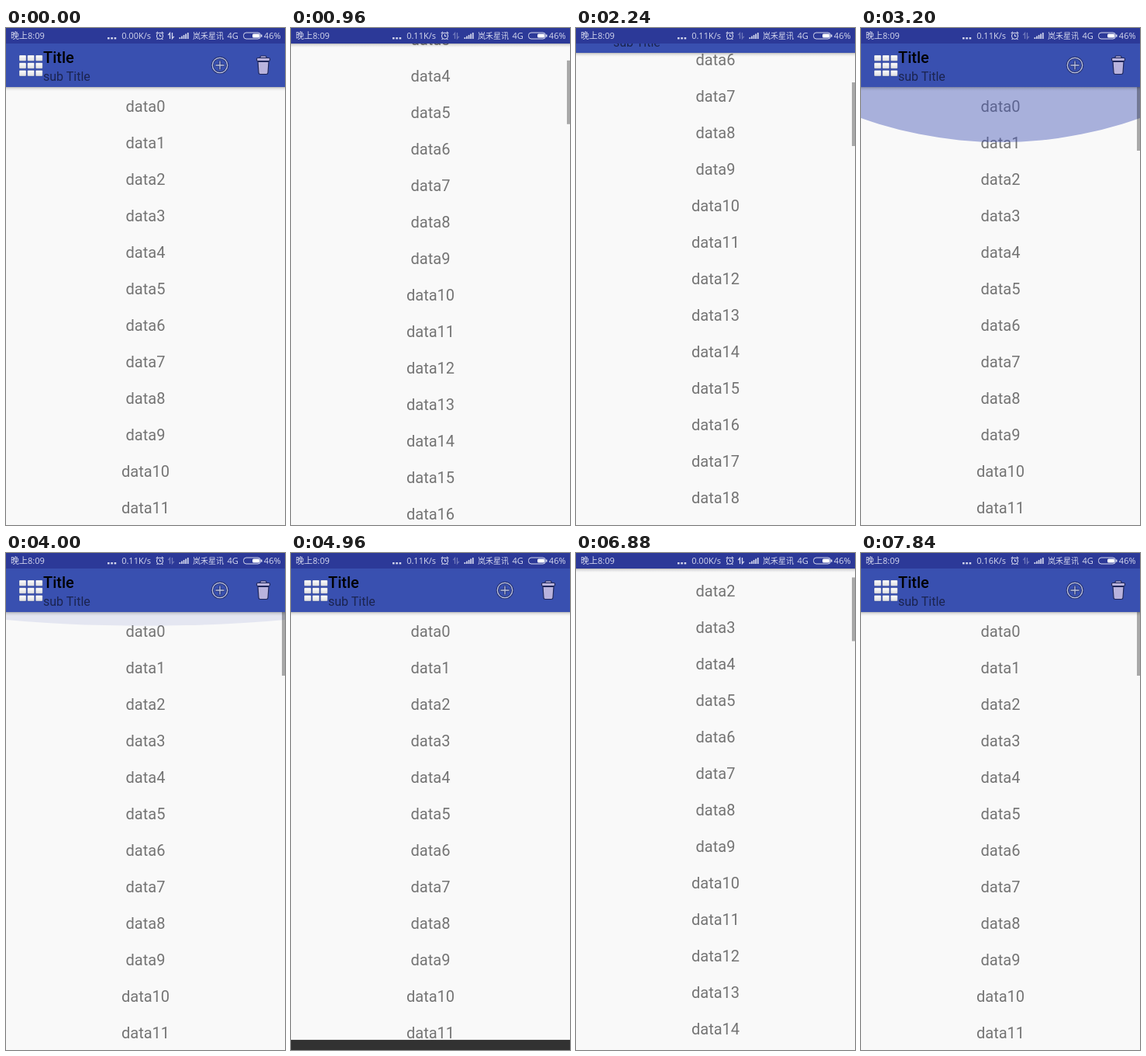
These frames come from a looping animation (360x640 px, 8 s). An HTML page:

```html
<!DOCTYPE html>
<html lang="zh">
<head>
<meta charset="utf-8">
<title>Scrolling list</title>
<style>
  html, body { margin: 0; width: 100%; height: 100%; overflow: hidden; background: #f9f9f9; }
  svg { display: block; width: 360px; height: 640px; }
  text { font-family: Roboto, "Noto Sans", sans-serif; }
  #rows { font-size: 20px; fill: #747474; text-anchor: middle; }
  #status text { font: 11px "Open Sans", "Noto Sans CJK SC", "Noto Sans CJK", sans-serif; fill: #d6d9ee; }
  #status .end { text-anchor: end; }
  #status .carrier { font-size: 10px; }
</style>
</head>
<body>
<svg viewBox="0 0 360 640">
  <defs>
    <linearGradient id="shade" x2="0" y2="1">
      <stop offset="0" stop-color="#000" stop-opacity=".26"/>
      <stop offset=".4" stop-color="#000" stop-opacity=".09"/>
      <stop offset="1" stop-color="#000" stop-opacity="0"/>
    </linearGradient>
    <linearGradient id="cell" x2="0" y2="1">
      <stop offset="0" stop-color="#fff"/>
      <stop offset="1" stop-color="#dcdcdf"/>
    </linearGradient>
    <clipPath id="below"><rect width="360" height="80"/></clipPath>
  </defs>

  <rect width="360" height="640" fill="#f9f9f9"/>
  <g id="rows"></g>
  <g id="glow"><g clip-path="url(#below)">
    <circle cx="180" cy="-469" r="540" fill="#3f51b5"/>
  </g></g>
  <rect id="thumb" x="356" width="4" height="82" fill="#000"/>

  <g id="bar">
    <rect y="76" width="360" height="5" fill="url(#shade)"/>
    <rect y="16" width="360" height="60" fill="#3950b0"/>
    <g id="grid" fill="url(#cell)" stroke="#2b3a80" stroke-opacity=".45" stroke-width=".7"></g>
    <text x="48" y="45" font-size="20" font-weight="500" fill="#000">Title</text>
    <text x="48" y="68" font-size="16" fill="#1b2450">sub Title</text>
    <g fill="none">
      <g stroke="#26326f" stroke-width="3.2">
        <circle cx="276" cy="48" r="9.7"/><path d="M270 48h12M276 42v12"/>
      </g>
      <g stroke="#bcc2e2" stroke-width="1.3">
        <circle cx="276" cy="48" r="9.7"/><path d="M270.5 48h11M276 42.5v11"/>
      </g>
    </g>
    <g fill="#b9b3dd" stroke="#20285c" stroke-width="1.2">
      <path d="M325 43.5h14l-1 14q-.2 2-2 2h-8q-1.8 0-2-2z"/>
      <path d="M328 39v-1.500q0-1.500 1.500-1.500h5q1.500 0 1.500 1.500v1.500z"/>
      <rect x="323.500" y="38.500" width="17" height="4" rx="1.500"/>
    </g>
  </g>

  <g id="status">
    <rect width="360" height="20" fill="#2c3998"/>
    <text x="6" y="14">晚上8:09</text>
    <g fill="#d6d9ee">
      <rect x="131" y="12" width="2.600" height="2.400"/>
      <rect x="135.300" y="12" width="2.600" height="2.400"/>
      <rect x="139.600" y="12" width="2.600" height="2.400"/>
    </g>
    <text id="speed" class="end" x="187" y="14"></text>
    <g fill="none" stroke="#d6d9ee" stroke-width="1.100">
      <circle cx="198.500" cy="10.300" r="4"/>
      <path d="M198.500 8v2.500h2M193.800 7l2.300-2M203.200 7l-2.300-2M195.800 13.600l-1.200 1.400M201.200 13.600l1.200 1.400"/>
      <path id="arrows" stroke-width="1.300" d="M211.500 14V6.500l-2.300 2.600M214.500 6v7.500l2.300-2.600"/>
    </g>
    <g id="signal" fill="#d6d9ee"></g>
    <text class="carrier" x="241" y="14">岚禾星讯</text>
    <text x="285.500" y="14">4G</text>
    <rect x="306.500" y="6" width="22" height="8" rx="3.500" fill="none" stroke="#d6d9ee"/>
    <rect x="318" y="7.500" width="9.500" height="5" rx="1.500" fill="#fff"/>
    <rect x="329" y="8.500" width="1.500" height="3" fill="#d6d9ee"/>
    <text class="end" x="354.500" y="14">46%</text>
  </g>

  <rect id="snack" width="360" height="48" fill="#323232"/>
</svg>

<script>
const LOOP = 8000, STEP = 160, ROW = 47;
const $ = id => document.getElementById(id);

function add(parent, tag, attrs, text = "") {
  const el = document.createElementNS("http://www.w3.org/2000/svg", tag);
  for (const key in attrs) el.setAttribute(key, attrs[key]);
  el.textContent = text;
  $(parent).append(el);
}

for (let i = 0; i < 24; i++) add("rows", "text", { x: 180, y: 107.5 + ROW * i }, "data" + i);
for (let i = 0; i < 9; i++) {
  add("grid", "rect", {
    x: 17 + 10.6 * (i % 3), y: 35 + 9.7 * Math.floor(i / 3), width: 9, height: 7.6, rx: 1
  });
}
for (let i = 0; i < 5; i++) {
  const h = 2 + 1.5 * i;
  add("signal", "rect", { x: 223.5 + 2.6 * i, y: 14 - h, width: 1.7, height: h });
}

// Each track is a list of [time, value] pairs.
// A drag moves the bar first; the list takes up the rest.
const hidden = [[160, 0], [400, 56], [2200, 56], [2240, 44], [2380, 0],
  [6400, 0], [6560, 56], [7040, 56], [7200, 0]];
const scroll = [[400, 0], [960, 171], [1700, 298], [2380, 298], [2960, 0],
  [6560, 0], [6880, 90], [7200, 90], [7520, 0]];
const thumbFade = [[100, 0], [300, 1], [4080, 1], [4440, 0], [6400, 0], [6560, 1]];
const glowSize = [[2960, 0], [3200, 1], [3680, 1], [4320, 0]];
const snackRise = [[4915, 0], [5085, 48], [6121, 48], [6291, 0]];
const speeds = [[0, "0.00"], [480, "0.11"], [5440, "0.00"], [7840, "0.16"]];

const linear = p => p;
const slowDown = p => 1 - (1 - p) ** 2;

// Cubic curve (.4, 0, .2, 1), solved for time by bisection.
function standard(p) {
  let lo = 0, hi = 1;
  for (let i = 0; i < 20; i++) {
    const u = (lo + hi) / 2, v = 1 - u;
    if (1.2 * v * v * u + .6 * v * u * u + u * u * u < p) lo = u; else hi = u;
  }
  return lo * lo * (3 - 2 * lo);
}

function at(track, t, ease = linear) {
  const i = track.findIndex(([time]) => time > t);
  if (i === 0) return track[0][1];
  if (i < 0) return track[track.length - 1][1];
  const [t0, a] = track[i - 1], [t1, b] = track[i];
  return a + (b - a) * ease((t - t0) / (t1 - t0));
}

const move = (id, y, more = "") => $(id).setAttribute("transform", `translate(0 ${y})${more}`);
const fade = (id, opacity) => $(id).setAttribute("opacity", opacity);

function draw(t) {
  const up = at(hidden, t), s = at(scroll, t), glow = at(glowSize, t, slowDown);
  move("bar", -up);
  move("rows", -up - s);
  move("thumb", 76 - up + s * .1275);
  fade("thumb", .32 * at(thumbFade, t));
  move("glow", 76 - up, ` scale(1 ${glow})`);
  fade("glow", .43 * glow);
  move("snack", 640 - at(snackRise, t, standard));

  const speed = speeds.filter(([time]) => time <= t).pop()[1];
  $("speed").textContent = speed + "K/s";
  fade("arrows", speed === "0.00" ? 1 : .4);
}

const start = performance.now();
function tick() {
  const t = (performance.now() - start) % LOOP;
  draw(Math.floor(t / STEP) * STEP);
  requestAnimationFrame(tick);
}
tick();
</script>
</body>
</html>
```
